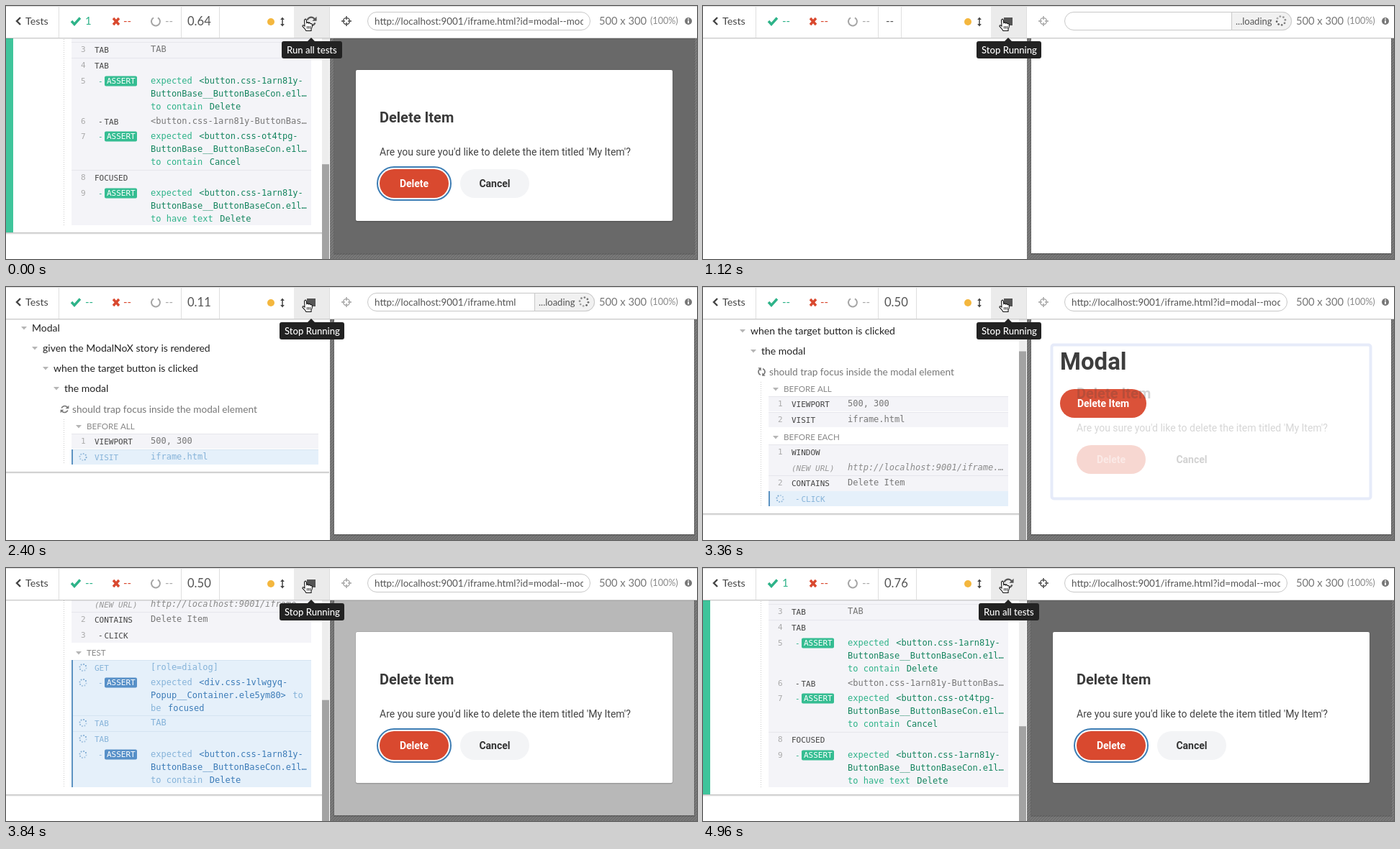
These frames come from a looping animation (960 px wide and 352 px high, 5.44 s). An HTML page with a canvas:

```html
<!DOCTYPE html>
<html lang="en">
<head>
<meta charset="utf-8">
<title>Modal test run</title>
<style>
html, body { margin: 0; width: 100%; height: 100%; overflow: hidden; background: #fff; }
canvas { display: block; width: 960px; height: 352px; }
</style>
</head>
<body>
<canvas id="stage" width="960" height="352"></canvas>
<script>
const ctx = document.getElementById('stage').getContext('2d');
const LOOP = 5440, STEP = 160;
const SANS = 'Lato, "Open Sans", sans-serif';
const MONO = '"DejaVu Sans Mono", "Liberation Mono", monospace';
const ROBOTO = 'Roboto, Arial, sans-serif';
const GREEN = '#2eb389', RED = '#d9492f';
const START = 1120, PASS = 4480, OPEN = 3360;
const BUTTON = ['expected |<button.css-1arn81y-', '|ButtonBase__ButtonBaseCon.e1l…'];

const tree = [['Modal', 36, 57], ['given the ModalNoX story is rendered', 51, 85],
  ['when the target button is clicked', 66, 113], ['the modal', 81, 141]];
const groups = [['BEFORE ALL', 194, 2240], ['BEFORE EACH', 261, 2880], ['TEST', 371, 3680]];

// top, bottom, shown at, done at, number, name, message lines
const rows = [
  [204, 225, 2240, 0, 1, 'VIEWPORT', ['500, 300']],
  [226, 247, 2240, 2880, 2, 'VISIT', ['iframe.html']],
  [271, 293, 2880, 0, 1, 'WINDOW', []],
  [293, 314, 2880, 0, '', '(NEW URL)', ['http://localhost:9001/iframe.…']],
  [314, 336, 3040, 3200, 2, 'CONTAINS', ['Delete Item']],
  [336, 357, 3200, 3680, 3, '-CLICK', []],
  [381, 402, 3680, 4160, 1, 'GET', ['[role=dialog]']],
  [402, 458, 3680, 4160, 2, 'ASSERT', ['expected |<div.css-1vlwgyq-', '|Popup__Container.ele5ym80>| to', 'be |focused']],
  [458, 480, 3680, 4160, 3, 'TAB', ['TAB']],
  [480, 502, 3840, 4160, 4, 'TAB', []],
  [502, 558, 3840, 4160, 5, 'ASSERT', [...BUTTON, 'to contain |Delete']],
  [558, 579, 4160, 4320, 6, '-TAB', ['<button.css-1arn81y-ButtonBas…']],
  [579, 636, 4160, 4320, 7, 'ASSERT', ['expected |<button.css-ot4tpg-', BUTTON[1], 'to contain |Cancel']],
  [636, 658, 4320, PASS, 8, 'FOCUSED', []],
  [658, 713, 4320, PASS, 9, 'ASSERT', [...BUTTON, 'to have text |Delete']]
];

function rect(x, y, w, h, fill) {
  ctx.fillStyle = fill;
  ctx.fillRect(x, y, w, h);
}
function round(x, y, w, h, r, fill, stroke, lw = 1) {
  ctx.beginPath();
  ctx.roundRect(x, y, w, h, r);
  if (fill) { ctx.fillStyle = fill; ctx.fill(); }
  if (stroke) { ctx.strokeStyle = stroke; ctx.lineWidth = lw; ctx.stroke(); }
}
function shape(points, fill) {
  ctx.beginPath();
  points.forEach(([x, y]) => ctx.lineTo(x, y));
  ctx.closePath();
  ctx.fillStyle = fill;
  ctx.fill();
}
function line(points, color, lw) {
  ctx.beginPath();
  points.forEach(([x, y]) => ctx.lineTo(x, y));
  ctx.strokeStyle = color;
  ctx.lineWidth = lw;
  ctx.stroke();
}
function arc(x, y, r, a, b, color, lw) {
  ctx.beginPath();
  ctx.arc(x, y, r, a, b);
  ctx.strokeStyle = color;
  ctx.lineWidth = lw;
  ctx.stroke();
}
function disc(x, y, r, fill) {
  ctx.beginPath();
  ctx.arc(x, y, r, 0, Math.PI * 2);
  ctx.fillStyle = fill;
  ctx.fill();
}
// y is the middle of the capitals; returns the advance
function text(s, x, y, size, color, family = SANS, style = '') {
  ctx.font = `${style} ${size}px ${family}`;
  ctx.fillStyle = color;
  ctx.fillText(s, x, y + size * 0.35);
  return ctx.measureText(s).width;
}
function clipped(x, y, w, h, draw) {
  ctx.save();
  ctx.beginPath();
  ctx.rect(x, y, w, h);
  ctx.clip();
  draw();
  ctx.restore();
}

function spinner(x, y, r, color, t) {
  for (let i = 0; i < 8; i++) {
    const a = i * Math.PI / 4 + t / 300;
    ctx.globalAlpha = 0.45 + i * 0.07;
    disc(x + r * Math.cos(a), y + r * Math.sin(a), r * 0.23, color);
  }
  ctx.globalAlpha = 1;
}
function refresh(x, y, r, color, turn = 0) {
  ctx.save();
  ctx.translate(x, y);
  ctx.rotate(turn);
  for (let i = 0; i < 2; i++) {
    arc(0, 0, r, 0.35, 2.6, color, r * 0.38);
    shape([[-r * 1.3, r * 0.15], [-r * 0.25, r * 0.15], [-r * 1.3, r * 1.15]], color);
    ctx.rotate(Math.PI);
  }
  ctx.restore();
}
function caret(x, y) {
  shape([[x - 4, y - 2], [x + 4, y - 2], [x, y + 2.5]], '#b5b5b5');
}

function drawRow([top, bottom, , done, num, name, lines], t, right) {
  const busy = t < done, y = top + 10.5, sub = name[0] === '-';
  const check = name === 'ASSERT', url = name === '(NEW URL)';
  rect(91, top, right - 91, bottom - top, busy ? '#e5f0fa' : '#f4f4f8');
  if (!check && !sub && !url) rect(91, top, right - 91, 1, busy ? '#d5e4f1' : '#e6e6ec');
  if (busy) {
    rect(91, top, 2, bottom - top, '#5d93c2');
    spinner(107, y, 4.6, '#6fa0cc', t);
  } else {
    text(num, 104, y, 11, '#aaa', MONO);
  }
  const color = busy ? '#86b3d9' : '#444';
  if (check || sub) text('-', 128, y, 11, check && !busy ? GREEN : color, MONO);
  if (check) {
    round(137, y - 7, 45, 14, 2, busy ? '#5790c8' : '#35bd92');
    text(name, 140, y, 11, '#fff', MONO);
  } else {
    text(sub ? name.slice(1) : name, sub ? 136.5 : 123, y + 0.5, 11, url ? '#999' : color, MONO, url ? 'italic' : '');
  }
  const plain = busy ? '#86b3d9' : check ? GREEN : url ? '#8a8a8a' : '#777';
  const strong = busy ? '#3d7cb8' : '#15855f';
  lines.forEach((l, i) => {
    let x = 201;
    l.split('|').forEach((part, k) => {
      if (!part) return;
      if (x > 201) x += 2.3;
      x += text(part, x, y - 0.5 + i * 18, 12, k % 2 ? strong : plain, MONO, url ? 'italic' : '');
    });
  });
}

function drawReporter(t, fresh) {
  const shown = rows.filter(r => fresh || t >= r[2]);
  const treeOn = fresh || t >= 1440, titleOn = fresh || t >= 2080;
  const last = shown.length ? shown[shown.length - 1][1] : 0;
  const end = last ? last + 10 : titleOn ? 184 : 156;
  const scroll = Math.max(0, end - 315);
  const right = scroll ? 424 : 434, edge = scroll ? 439 : 449;
  const now = fresh ? LOOP : t;
  clipped(0, 45, 450, 307, () => {
    rect(0, 45, 450, 307, '#fff');
    ctx.save();
    ctx.translate(0, -scroll);
    if (treeOn) {
      tree.forEach(([s, x, y]) => { caret(x - 11, y); text(s, x, y, 14, '#222'); });
      rect(0, end, edge, 1, '#c4c4c4');
      rect(0, end + 1, edge, 1, '#dedede');
      rect(0, end + 2, edge, 1, '#f3f3f3');
    }
    if (titleOn) {
      if (now >= PASS) rect(0, 156, 10, end - 156, '#3fc49b');
      refresh(81.5, 170, 4.5, '#777', (t - 2400) * Math.PI / 384);
      text('should trap focus inside the modal element', 92, 170, 13.65, '#777');
    }
    if (last) {
      ctx.setLineDash([1, 2]);
      line([[80.5, 184], [80.5, last]], '#ccc', 1);
      ctx.setLineDash([]);
    }
    groups.forEach(([s, y, at]) => {
      if (now < at) return;
      caret(101, y);
      text(s, 112, y, 11.6, '#888');
    });
    shown.forEach(r => drawRow(r, now, right));
    ctx.restore();
    if (scroll) {
      const top = 45 + 307 * scroll / (scroll + 307);
      rect(439, 45, 10, 307, '#ededed');
      rect(439, top, 10, 352 - top, '#a3a3a3');
    }
  });
}

function pill(x, y, w, fill, label, color) {
  if (fill) round(x, y, w, 40, 20, fill);
  ctx.textAlign = 'center';
  text(label, x + w / 2, y + 20, 14, color, ROBOTO, 'bold');
  ctx.textAlign = 'left';
}
function focusRing(x, alpha) {
  if (!alpha) return;
  ctx.save();
  ctx.globalAlpha *= alpha;
  round(x - 3, 224, 102, 46, 23, null, '#3d7eb5', 2);
  ctx.restore();
}
function drawPopup(alpha, shift, deleteRing, cancelRing, halo) {
  ctx.save();
  ctx.translate(0, shift);
  if (halo) round(484.5, 87.5, 443, 214, 3, null, `rgba(205,216,243,${halo})`, 4);
  // the pale surfaces come in later than the text
  ctx.globalAlpha = alpha * alpha;
  if (alpha === 1) round(485.5, 88.5, 441, 212, 3, 'rgba(0,0,0,.16)');
  round(486, 89, 440, 210, 2, '#fff');
  round(631, 227, 96, 40, 20, '#f3f4f6');
  ctx.globalAlpha = alpha;
  text('Delete Item', 519, 155, 20, '#3a3a3a', ROBOTO, 'bold');
  text("Are you sure you'd like to delete the item titled 'My Item'?", 519, 203, 14, '#444', ROBOTO);
  focusRing(519, deleteRing);
  focusRing(631, cancelRing);
  round(519, 227, 96, 40, 20, RED);
  pill(631, 227, 96, null, 'Cancel', '#333');
  ctx.globalAlpha = Math.sqrt(alpha);
  pill(519, 227, 96, null, 'Delete', '#fff');
  ctx.restore();
}

function drawPage(t, fresh) {
  clipped(450, 45, 510, 307, () => {
    rect(450, 45, 510, 307, '#7c7c7c');
    for (let x = 130; x < 960; x += 4) line([[x, 352], [x + 307, 45]], '#6b6b6b', 1.2);
    rect(455, 45, 502, 301, 'rgba(0,0,0,.14)');
  });
  clipped(456, 45, 500, 299, () => {
    rect(456, 45, 500, 299, '#fff');
    if (!fresh && t < 3040) return;
    text('Modal', 496, 103, 33, '#333', ROBOTO, 'bold');
    pill(496, 142, 120, RED, 'Delete Item', '#fff');
    if (!fresh && t < OPEN) return;
    const k = fresh ? 9 : (t - OPEN) / STEP;
    rect(456, 45, 500, 299, `rgba(0,0,0,${Math.min(0.59, k * 0.0927)})`);
    let del = 0, cancel = 0;
    if (fresh) del = t < 960 ? 1 : 0;
    else if (t >= 4640) del = t < 4800 ? 0.5 : 1;
    else if (t >= 4160) cancel = t < PASS ? 1 : 0.3;
    else if (t >= 3840) del = 1;
    drawPopup(Math.min(1, 0.22 + k * 0.4), Math.min(0, -7 + k * 3.5), del, cancel, k < 3 ? 0.5 : 0);
  });
}

function drawHeader(t, fresh) {
  const done = fresh || t >= PASS;
  const time = fresh ? '0.64' : done ? '0.76' : t >= 3200 ? '0.50' : t >= 2880 ? '0.36' : t >= 2240 ? '0.11' : '--';
  const loading = !done && t < 2880;
  rect(0, 0, 960, 44, '#fff');
  rect(400, 0, 49, 44, '#ebebeb');
  rect(0, 44, 960, 1, '#cfcfcf');
  rect(0, 45, 960, 1, 'rgba(0,0,0,.09)');
  rect(0, 0, 960, 1, '#d9d9d9');
  [73, 243, time === '--' ? 275 : 296, 449].forEach(x => rect(x, 0, 1, 44, '#dfdfdf'));

  line([[20, 16], [15, 21], [20, 26]], '#444', 2.4);
  text('Tests', 27, 21, 14.3, '#444');
  line([[91, 21], [95, 25.5], [103, 16.5]], GREEN, 3.4);
  text(done ? '1' : '--', 110, 21, 15, GREEN);
  line([[149, 17], [157, 26]], RED, 3.4);
  line([[157, 17], [149, 26]], RED, 3.4);
  text('--', 163, 21, 15, RED);
  arc(208, 21.5, 6, -1.05, 4.2, '#a5a5a5', 2);
  text('--', 221, 21, 15, '#aaa');
  text(time, time === '--' ? 254 : 252, 21, time === '--' ? 15 : 16.6, '#555');

  disc(368, 22, 5, '#f4b73e');
  line([[384, 18], [384, 26]], '#444', 1.5);
  shape([[381.2, 19], [386.8, 19], [384, 15.5]], '#444');
  shape([[381.2, 25], [386.8, 25], [384, 28.5]], '#444');

  if (done) refresh(424, 21.5, 5.8, '#555');
  else rect(418, 16, 12, 11, '#555');

  const aim = done ? '#555' : '#aaa';
  arc(473, 21, 4.5, 0, 7, aim, 1.5);
  [[473, 14, 473, 19], [473, 23, 473, 28], [466, 21, 471, 21], [475, 21, 480, 21]]
    .forEach(([a, b, c, d]) => line([[a, b], [c, d]], aim, 1.6));

  round(502.5, 8.5, loading ? 315 : 309, 25, 12.5, '#fff', '#c8c8c8');
  if (loading) {
    round(734.5, 8.5, 83, 25, [0, 12.5, 12.5, 0], '#f1f1f1', '#c8c8c8');
    text('...loading', 740, 21, 13, '#555');
    spinner(803, 20.5, 6, '#555', t);
  }
  const base = 'http://localhost:9001/iframe.html';
  clipped(510, 9, 292, 24, () => {
    if (!loading) text(base + '?id=modal--modal-no-x', 512, 21, 13.4, '#555');
    else if (t >= 2240) text(base, 512, 21, 13.4, '#555');
  });
  text('500 x 300', 824, 21, 14.7, '#777');
  text('(100%)', 895, 21, 12.6, '#888');
  disc(948, 21, 5, '#777');
  rect(947, 20, 2, 4, '#fff');
  rect(947, 17.5, 2, 1.5, '#fff');

  const tip = done ? 'Run all tests' : 'Stop Running', half = done ? 42 : 45;
  shape([[418, 50], [424, 44], [430, 50]], '#222');
  round(425 - half, 49, half * 2, 24, 3, '#222');
  text(tip, 432 - half, 61, 13.1, '#fff', SANS, '500');
}

function drawHand() {
  ctx.save();
  ctx.translate(411, 17);
  ctx.beginPath();
  ctx.moveTo(4, 11);
  ctx.lineTo(3.6, 2.5);
  ctx.quadraticCurveTo(4.6, 0, 6.2, 2.2);
  ctx.lineTo(6.8, 6.5);
  ctx.quadraticCurveTo(8.5, 5, 9.5, 7);
  ctx.quadraticCurveTo(11.2, 5.8, 12, 7.6);
  ctx.quadraticCurveTo(14.2, 7, 14.4, 9);
  ctx.quadraticCurveTo(14.8, 12, 13, 15);
  ctx.lineTo(13, 17.5);
  ctx.lineTo(6, 17.5);
  ctx.quadraticCurveTo(4, 14, 1, 11.3);
  ctx.quadraticCurveTo(0.8, 8.5, 4, 11);
  ctx.closePath();
  ctx.fillStyle = '#fff';
  ctx.fill();
  ctx.strokeStyle = '#111';
  ctx.lineWidth = 1.1;
  ctx.stroke();
  [7.4, 9.5, 11.6].forEach(x => line([[x, 11], [x, 14.5]], '#111', 0.9));
  ctx.restore();
}

const begin = performance.now();
function loop() {
  const now = (performance.now() - begin) % LOOP;
  const t = Math.min(Math.floor(now / STEP) * STEP, 4960);
  const fresh = t < START;
  drawReporter(t, fresh);
  drawPage(t, fresh);
  drawHeader(t, fresh);
  drawHand();
  requestAnimationFrame(loop);
}
loop();
</script>
</body>
</html>
```
